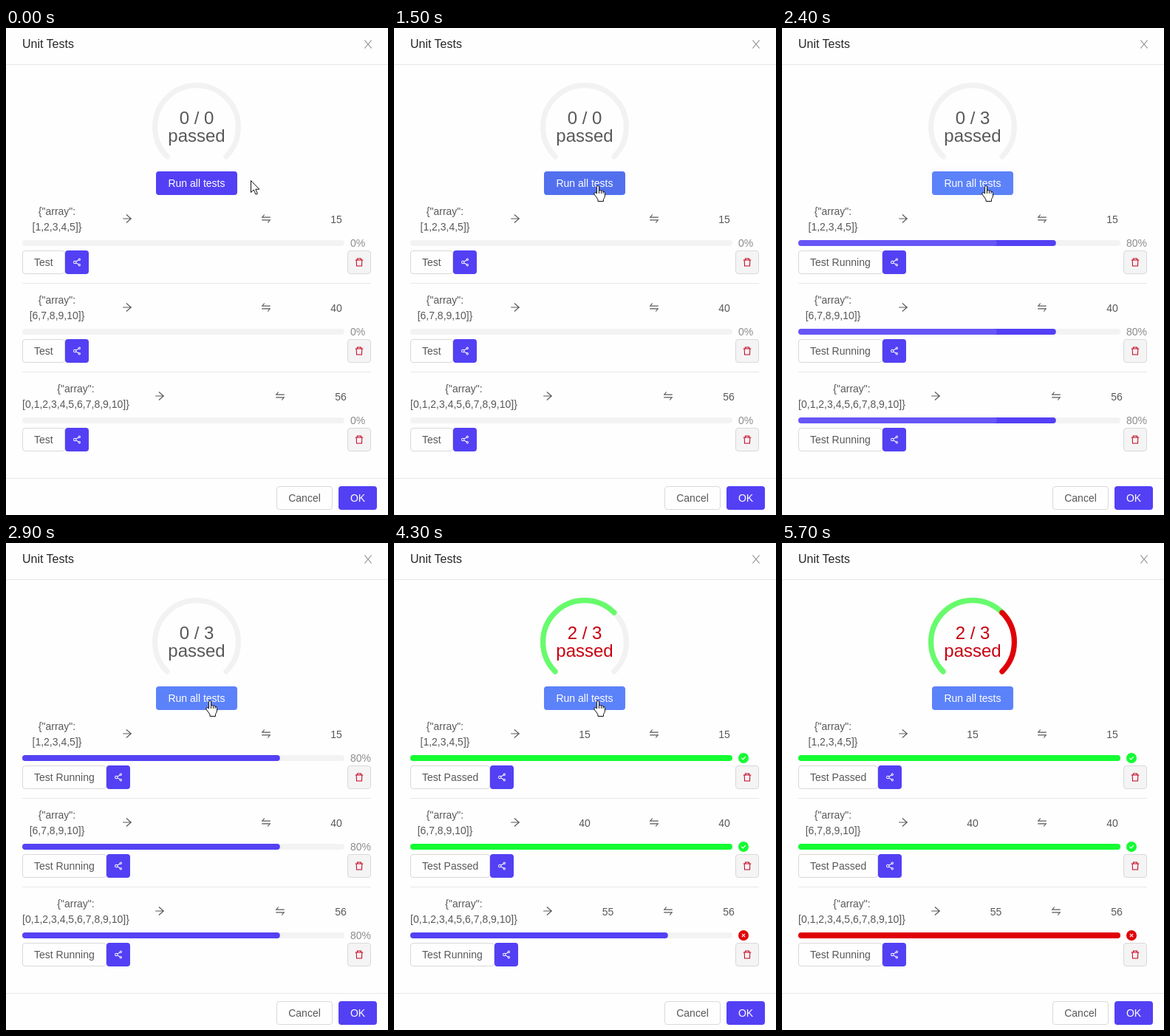
An HTML page that plays this animation: 517 by 659 pixels, repeating every 5800 ms.

```html
<!DOCTYPE html>
<html lang="en">
<head>
<meta charset="utf-8">
<title>Unit Tests</title>
<style>
  html, body { margin: 0; width: 100%; height: 100%; overflow: hidden; background: #fefefe; }
  svg { display: block; font: 14px "Liberation Sans", Arial, sans-serif; }
</style>
</head>
<body>
<svg id="stage" width="517" height="659" viewBox="0 0 517 659"></svg>
<script>
const LOOP = 5800, TICK = 100;
const RUN = 1590;       // all tests start
const SPEED = 1.18;     // page time per shown time
const BLUE = [83, 64, 244], HOVER = [92, 130, 250], PRESS = [82, 112, 238];
const GREEN = [20, 252, 50], RED = [224, 0, 8];
const INK = '#595959', CRIMSON = '#c4001d';

const rows = [
  { list: '[1,2,3,4,5]}', want: 15, got: 15, done: 3150, x: [69, 164, 258, 352, 447] },
  { list: '[6,7,8,9,10]}', want: 40, got: 40, done: 3300, x: [69, 164, 258, 352, 447] },
  { list: '[0,1,2,3,4,5,6,7,8,9,10]}', want: 56, got: 55, done: 4300, x: [94.5, 208, 289.5, 371, 453] }
];

// Icons on a 1024 unit grid
const icons = {
  close: 'M215 160L809 864M809 160L215 864',
  arrow: 'M144 512H850M440 160L850 512 440 866',
  swap: 'M880 394H176L368 160M144 630H848L655 864',
  share: 'M436 512a124 124 0 1 0-248 0a124 124 0 1 0 248 0M838 240a86 86 0 1 0-172 0a86 86 0 1 0 172 0' +
    'M838 784a86 86 0 1 0-172 0a86 86 0 1 0 172 0M425 445L675 292M425 579L675 732',
  trash: 'M128 292H896M324 256V148H700V256M232 300L258 876H766L792 300',
  check: 'M340 510L462 640 690 400',
  cross: 'M375 375L649 649M649 375L375 649'
};
const ARROW = 'M.5.5V16.5L4.3 13 7 19.2 9.4 18.2 6.8 12.2H11.8Z';
const HAND = 'M4.6 11V1.8Q4.6.5 6 .5T7.5 1.8V7Q9 6 10.4 7.3 12 6.6 13 8.2 15.5 8 15.5 10.5V14Q15.4 16.5 13.5 18.5V21.5H6V19' +
  'L1 12Q.3 10 2 9.6 3.5 9.8 4.6 11ZM7.5 7V11M10.4 7.5V11M13 8.5V11';
const ARC = 'M218.1 173.9A56.4 56.4 0 1 1 297.9 173.9';

const clamp = v => Math.max(0, Math.min(1, v));
const mix = (a, b, k) => a + (b - a) * k;
const blend = (a, b, k) => `rgb(${a.map((v, i) => Math.round(mix(v, b[i], k)))})`;

function bezier(x1, y1, x2, y2) {
  const at = (a, b, s) => 3 * a * s * (1 - s) ** 2 + 3 * b * s * s * (1 - s) + s ** 3;
  return x => {
    if (x <= 0) return 0;
    if (x >= 1) return 1;
    let lo = 0, hi = 1;
    for (let i = 0; i < 24; i++) {
      const m = (lo + hi) / 2;
      if (at(x1, x2, m) < x) lo = m; else hi = m;
    }
    return at(y1, y2, lo);
  };
}
const grow = bezier(.08, .82, .17, 1);
const sweep = bezier(.23, 1, .32, 1);
const ease = bezier(.25, .1, .25, 1);
const passed = (t, start, ms) => clamp((t - start) * SPEED / ms);

const text = (s, x, y, fill = INK, size = 14, anchor = 'middle') =>
  `<text x="${x}" y="${y}" fill="${fill}" font-size="${size}" text-anchor="${anchor}">${s}</text>`;
const box = (x, y, w, h, fill, r = 4, more = '') =>
  `<rect x="${x}" y="${y}" width="${w}" height="${h}" rx="${r}" fill="${fill}" ${more}/>`;
const outlined = (x, y, w, h, fill) => box(x + .5, y + .5, w - 1, h - 1, fill, 3.5, 'stroke="#d9d9d9"');
const line = (x, w, y) => box(x, y, w, 1, '#e8e8e8', 0);
const icon = (name, x, y, size, color) =>
  `<path d="${icons[name]}" fill="none" stroke="${color}" stroke-width="74" transform="translate(${x - size / 2} ${y - size / 2}) scale(${size / 1024})"/>`;
const arc = (color, from, len) => len > 0
  ? `<path d="${ARC}" pathLength="3" fill="none" stroke="${color}" stroke-width="7.2" stroke-linecap="round" stroke-dasharray="${len} 9" stroke-dashoffset="${-from}"/>` : '';

function gauge(t) {
  const total = t >= RUN ? 3 : 0;
  const good = rows.filter(r => r.got === r.want && t >= r.done).length;
  const color = t >= 4300 ? '#c8000f' : INK;
  return arc('#f2f2f2', 0, 3) +
    arc('#67fb6c', 0, 2 * ease(passed(t, 3300, 400))) +
    arc('#e00008', 2, ease(passed(t, 4300, 350))) +
    text(`${good} / ${total}`, 258, 130, color, 24) + text('passed', 258, 154, color, 24);
}

function runButton(t) {
  const wave = grow(passed(t, RUN, 400)) * 6;
  const glow = t < RUN ? 0 : .2 * (1 - grow(passed(t, RUN, 2000)));
  const fill = t >= 1500 && t < RUN ? blend(PRESS, PRESS, 0) : blend(BLUE, HOVER, clamp((t - 300) / 300));
  return (glow > .004 ? box(203 - wave, 194 - wave, 110 + 2 * wave, 32 + 2 * wave, blend(BLUE, BLUE, 0), 4 + wave, `opacity="${glow}"`) +
    box(203, 194, 110, 32, '#fefefe') : '') +
    box(203, 194, 110, 32, fill) + text('Run all tests', 258, 215, '#fff');
}

function bar(row, t, y) {
  if (t < RUN) return '';
  const end = grow(passed(t, row.done, 400));
  const width = 348.8 * grow(passed(t, RUN, 400)) + 87.2 * end;
  const k = sweep(passed(t, 1998, 1920));
  const shine = t < row.done && k > 0 && k < .99
    ? box(22, y, width * k, 8, '#fff', 4, `opacity="${.5 * (1 - k)}"`) : '';
  return box(22, y, width, 8, blend(BLUE, row.got === row.want ? GREEN : RED, end)) + shine;
}

function testRow(row, i, t) {
  const dy = 120 * i, mid = 317 + dy, [a, b, c, d, e] = row.x;
  const done = t >= row.done, ok = row.got === row.want;
  const [label, shareX] = t < RUN ? ['Test', 80] : done && ok ? ['Test Passed', 130] : ['Test Running', 136];
  const status = done
    ? `<circle cx="473" cy="${291 + dy}" r="7" fill="${blend(ok ? GREEN : RED, RED, 0)}"/>` +
      icon(ok ? 'check' : 'cross', 473, 291 + dy, 16, '#fff')
    : text(t < RUN ? '0%' : '80%', 466, 296 + dy, '#8c8c8c', 14, 'start');
  return text('{"array":', a, 253 + dy) + text(row.list, a, 274 + dy) +
    icon('arrow', b, 258 + dy, 16, INK) + icon('swap', d, 258 + dy, 16, INK) +
    (done ? text(row.got, c, 264 + dy) : '') + text(row.want, e, 264 + dy) +
    box(22, 287 + dy, 436, 8, '#f3f3f3') + bar(row, t, 287 + dy) + status +
    outlined(22, 301 + dy, shareX - 22, 32, '#fefefe') + text(label, 38, 322 + dy, INK, 14, 'start') +
    box(shareX, 301 + dy, 32, 32, blend(BLUE, BLUE, 0)) + icon('share', shareX + 16, mid, 14, '#fff') +
    outlined(462, 301 + dy, 32, 32, '#f4f4f4') + icon('trash', 478, mid, 14, CRIMSON) +
    (i < 2 ? line(22, 472, 345 + dy) : '');
}

// Stops of the pointer: time, x, y
const path = [[200, 331, 206], [700, 275, 213], [4700, 275, 213], [4900, 238, 174], [5000, 238, 174], [5300, 91, 9], [5500, 91, 9]];

function pointer(t) {
  if (t >= 5500) return '';
  let x = 331, y = 206;
  for (let i = 1; i < path.length && t >= path[i - 1][0]; i++) {
    const [t0, x0, y0] = path[i - 1], [t1, x1, y1] = path[i];
    const k = clamp((t - t0) / (t1 - t0));
    x = mix(x0, x1, k);
    y = mix(y0, y1, k);
  }
  const over = x > 203 && x < 313 && y > 194 && y < 226;
  return `<path d="${over ? HAND : ARROW}" transform="translate(${over ? x - 5 : x} ${y})" fill="#fff" stroke="#111" stroke-linejoin="round"/>`;
}

const stage = document.getElementById('stage');
const frame = text('Unit Tests', 22, 27, '#262626', 16, 'start') + icon('close', 490, 22, 16, '#8c8c8c') +
  line(0, 517, 49) + line(0, 517, 609) +
  outlined(366, 620, 76, 32, '#fefefe') + text('Cancel', 404, 641) +
  box(450, 620, 52, 32, blend(BLUE, BLUE, 0)) + text('OK', 476, 641, '#fff');

let shown = -1;
function draw(now) {
  const t = Math.floor(now % LOOP / TICK) * TICK;
  if (t !== shown) {
    shown = t;
    stage.innerHTML = frame + gauge(t) + runButton(t) + rows.map((r, i) => testRow(r, i, t)).join('') + pointer(t);
  }
  requestAnimationFrame(draw);
}
draw(0);
</script>
</body>
</html>
```
